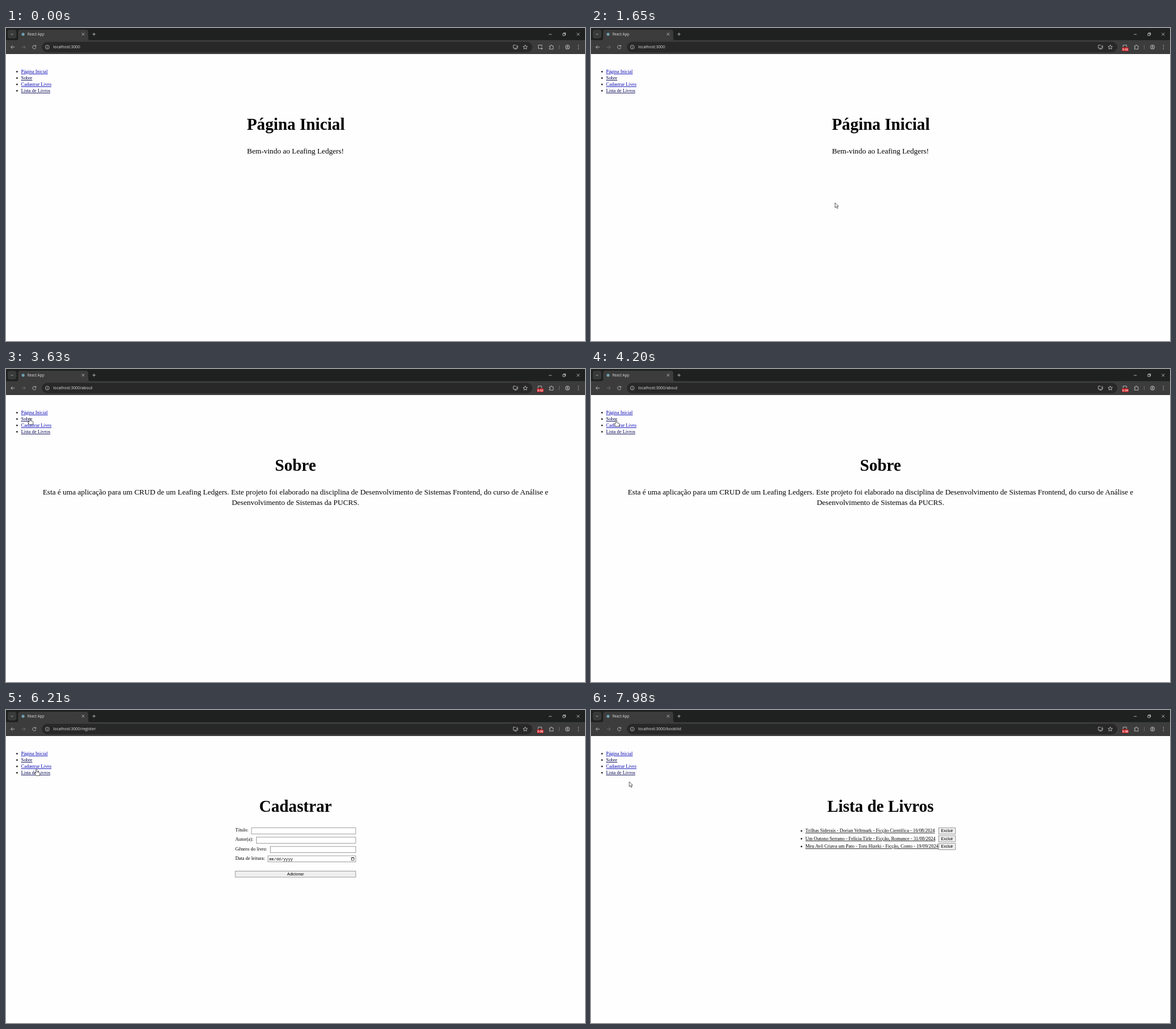
These frames come from a looping animation (1000 px wide and 541 px high, 8000 ms). An HTML page:

```html
<!DOCTYPE html>
<html lang="pt-BR">
<head>
<meta charset="utf-8">
<title>React App</title>
<style>
  html, body { margin: 0; height: 100%; overflow: hidden; background: #fefefe; }
  svg { display: block; width: 100vw; height: 100vh; }
  text { font: 8.33px "Liberation Serif", "Times New Roman", serif; white-space: pre; }
  .ui { font-family: "Open Sans", sans-serif; fill: #dedede; }
  .icon { fill: none; stroke: #cfcfcf; stroke-width: .8; }
  .dim { stroke: #777; }
  .link { fill: #0000b4; text-decoration: underline; }
  .dark { fill: #000050; }
  .mid { text-anchor: middle; }
  .h1 { font-size: 28.6px; font-weight: bold; }
  .p { font-size: 13.02px; }
  .btn { font: 6.94px "Liberation Sans", Arial, sans-serif; }
  .box { fill: #fff; stroke: #767676; stroke-width: .7; }
  .grey { fill: #efefef; }
  .page { display: none; }
</style>
</head>
<body>
<svg viewBox="0 0 1000 541" preserveAspectRatio="none">
  <rect width="1000" height="541" fill="#fefefe"/>

  <!-- browser window -->
  <rect width="1000" height="22" fill="#1f2120"/>
  <rect y="21" width="1000" height="24" fill="#3c3c3c"/>
  <path d="M18 21q3 0 3-3V7q0-4 4-4h113q4 0 4 4v11q0 3 3 3z" fill="#3c3c3c"/>
  <rect x="3" y="3" width="15" height="15" rx="4" fill="#383a39"/>
  <rect x="62" y="24" width="847" height="18" rx="9" fill="#282828"/>
  <circle cx="29.5" cy="10.8" r="2.6" fill="#6f9fb0"/>
  <text class="ui" x="37" y="13" style="font-size:6.2px">React App</text>
  <text class="ui" id="url" x="81.5" y="35.3" style="font-size:6.9px"></text>
  <g class="icon">
    <path d="M8.5 9.8l2 2 2-2M131 8.4l4.4 4.4m0-4.4l-4.4 4.4M149.300 10.700h5.400m-2.700-2.700v5.400"/>
    <path d="M15 33H8.500m3-3l-3 3 3 3"/>
    <path class="dim" d="M27 33h6.500m-3-3l3 3-3 3"/>
    <path d="M51.300 31.300a3 3 0 1 0 .5 2.200M51.700 29.600v2.200h-2.200"/>
    <circle cx="71.300" cy="33" r="3.300"/><path d="M71.300 32.600v2.200m0-3.900v.8"/>
    <path d="M880.500 29.700h-4.300v5.300h7.500v-1.700m-5.500 3.200h3.800m1-7v3.600m-1.600-1.500l1.600 1.600 1.600-1.600"/>
    <path d="M896.800 29.300l1.100 2.500 2.700.2-2.100 1.800.7 2.700-2.400-1.500-2.400 1.500.7-2.700-2.100-1.800 2.700-.2z"/>
    <path d="M938.700 31h2q-.2-1.800 1.100-1.800t1.100 1.800h2.200v5.500h-6.400v-2q1.500 0 1.500-.9t-1.500-.9z"/>
    <path class="dim" d="M955.500 29.500v7"/>
    <circle cx="969.800" cy="33" r="3.600"/><circle cx="969.800" cy="32" r="1.200"/><path d="M967.400 35.400q2.400-2 4.800 0"/>
    <path d="M988.600 29.600v1.200m0 1.600v1.200m0 1.600v1.200" stroke-width="1.200"/>
    <path d="M937.500 11h5M961.700 9.500h3.600v3.600h-3.600zm1.200 0v-1.100h3.600V12h-1.200M985.800 8.400l4.800 4.800m0-4.800l-4.800 4.800"/>
  </g>
  <path id="idle" class="icon" d="M925.500 32v-2.500h-6v6h3m2.500-2v4m-2-2h4"/>
  <g id="recording">
    <path class="icon" d="M919 33.500v-4h6v4"/>
    <rect x="917" y="33.500" width="11.500" height="6.500" rx="1" fill="#c3161c"/>
    <text id="clock" class="btn mid" x="922.700" y="38.600" fill="#fff" style="font-size:5px;font-weight:bold"></text>
  </g>

  <!-- site menu -->
  <g id="menu"></g>

  <!-- pages -->
  <g class="page">
    <text class="h1 mid" x="500.500" y="175.500">Página Inicial</text>
    <text class="p mid" x="500" y="217">Bem-vindo ao Leafing Ledgers!</text>
  </g>
  <g class="page">
    <text class="h1 mid" x="500" y="175.500">Sobre</text>
    <text class="p mid" x="500" y="217">Esta é uma aplicação para um CRUD de um Leafing Ledgers. Este projeto foi elaborado na disciplina de Desenvolvimento de Sistemas Frontend, do curso de Análise e</text>
    <text class="p mid" x="500" y="235">Desenvolvimento de Sistemas da PUCRS.</text>
  </g>
  <g class="page">
    <text class="h1 mid" x="500" y="175.500">Cadastrar</text>
    <g id="form"></g>
    <text x="454.500" y="259.800" style="font:6.800px 'Liberation Mono',monospace">mm/dd/yyyy</text>
    <path d="M596.500 255.300h4.600v4.500h-4.600z" fill="none" stroke="#111" stroke-width=".7"/>
    <path d="M596.500 255.500h4.600" stroke="#111" stroke-width="1.200"/>
    <rect class="box grey" x="396" y="278.300" width="208" height="10.700"/>
    <text class="btn mid" x="500" y="286.200">Adicionar</text>
  </g>
  <g class="page">
    <text class="h1 mid" x="500" y="175.500">Lista de Livros</text>
    <g id="books"></g>
  </g>

  <g id="cursor" fill="#fff" stroke="#222" stroke-width=".7" stroke-linejoin="round">
    <path id="arrow" d="M0 0v8.500l2-1.800 1.400 3.200 1.400-.6-1.400-3.100h2.700z"/>
    <path id="hand" d="M-1 1a1 1 0 0 1 2 0v3.500l4 .9q1.200.3 1 1.600L5.400 11H-.5l-2.800-4q0-1 1-.8L-1 7z"/>
  </g>
</svg>
<script>
const $ = id => document.getElementById(id);
const dot = (x, y) => `<circle cx="${x}" cy="${y}" r="1.300"/>`;

$('menu').innerHTML = ['Página Inicial', 'Sobre', 'Cadastrar Livro', 'Lista de Livros'].map((name, i) =>
  dot(19, 75.5 + 11 * i) +
  `<text class="link ${i % 2 ? 'dark' : ''}" x="26" y="${78 + 11 * i}">${name}</text>`).join('');

$('form').innerHTML = [['Título:', 424], ['Autor(a):', 432.5], ['Gênero do livro:', 456.5], ['Data de leitura:', 452.5]]
  .map(([label, x], i) => {
    const y = 210.3 + 16.1 * i;
    return `<text x="396" y="${y}">${label}</text>
      <rect class="box" x="${x}" y="${y - 6.6}" width="${604 - x}" height="10.500"/>`;
  }).join('');

$('books').innerHTML = [
  'Trilhas Siderais - Dorian Veltmark - Ficção Científica - 16/08/2024',
  'Um Outono Serrano - Felícia Tirle - Ficção, Romance - 31/08/2024',
  'Meu Avô Criava um Pato - Toru Hizeki - Ficção, Conto - 19/09/2024'
].map((book, i) => {
  const y = 211.3 + 13.5 * i;
  return dot(363.5, y - 2.3) +
    `<text x="370.300" y="${y}" style="text-decoration:underline ${i === 1 ? '#333' : '#aaa'}">${book}</text>
     <rect class="box grey" x="600.500" y="${y - 7.6}" width="29" height="10.700"/>
     <text class="btn mid" x="615" y="${y + .1}">Excluir</text>`;
}).join('');

const DURATION = 8000;
const pages = [...document.querySelectorAll('.page')];
const routes = [[0, ''], [3630, '/about'], [5490, '/register'], [7190, '/booklist']];

// time, x, y of the pointer tip
const path = [
  [450, 560, 385], [710, 421.500, 302], [1750, 421.500, 302], [2020, 62, 90],
  [2120, 62, 90], [2300, 55, 84], [2640, 55, 84], [2650, 44, 76], [2920, 44, 76],
  [3010, 42.500, 81], [3230, 41, 85], [4150, 41, 85], [4360, 50, 98.500],
  [6160, 50, 98.500], [6210, 52.500, 102.500], [6330, 57, 106], [6800, 57, 106],
  [6810, 59, 109], [7790, 59, 109], [7980, 66, 124]
];

function pointerAt(t) {
  const next = path.findIndex(p => p[0] > t);
  if (next < 0) return path.at(-1).slice(1);
  if (next === 0) return path[0].slice(1);
  const [t0, x0, y0] = path[next - 1], [t1, x1, y1] = path[next];
  const k = (t - t0) / (t1 - t0);
  return [x0 + (x1 - x0) * k, y0 + (y1 - y0) * k];
}

const show = (el, on) => el.style.display = on ? 'inline' : 'none';

function render(t) {
  const current = routes.findLastIndex(([start]) => t >= start);
  pages.forEach((page, i) => show(page, i === current));
  $('url').textContent = 'localhost:3000' + routes[current][1];

  const started = t >= 450;
  show($('idle'), !started);
  show($('recording'), started);
  $('clock').textContent = '0:0' + Math.floor((t + 60) / 980);

  const hand = t >= 3100 && t < 7850;
  show($('cursor'), started);
  show($('hand'), hand);
  show($('arrow'), !hand);
  $('cursor').setAttribute('transform', `translate(${pointerAt(t)})`);
}

const origin = performance.now();
function tick() {
  render((performance.now() - origin) % DURATION);
  requestAnimationFrame(tick);
}
tick();
</script>
</body>
</html>
```
